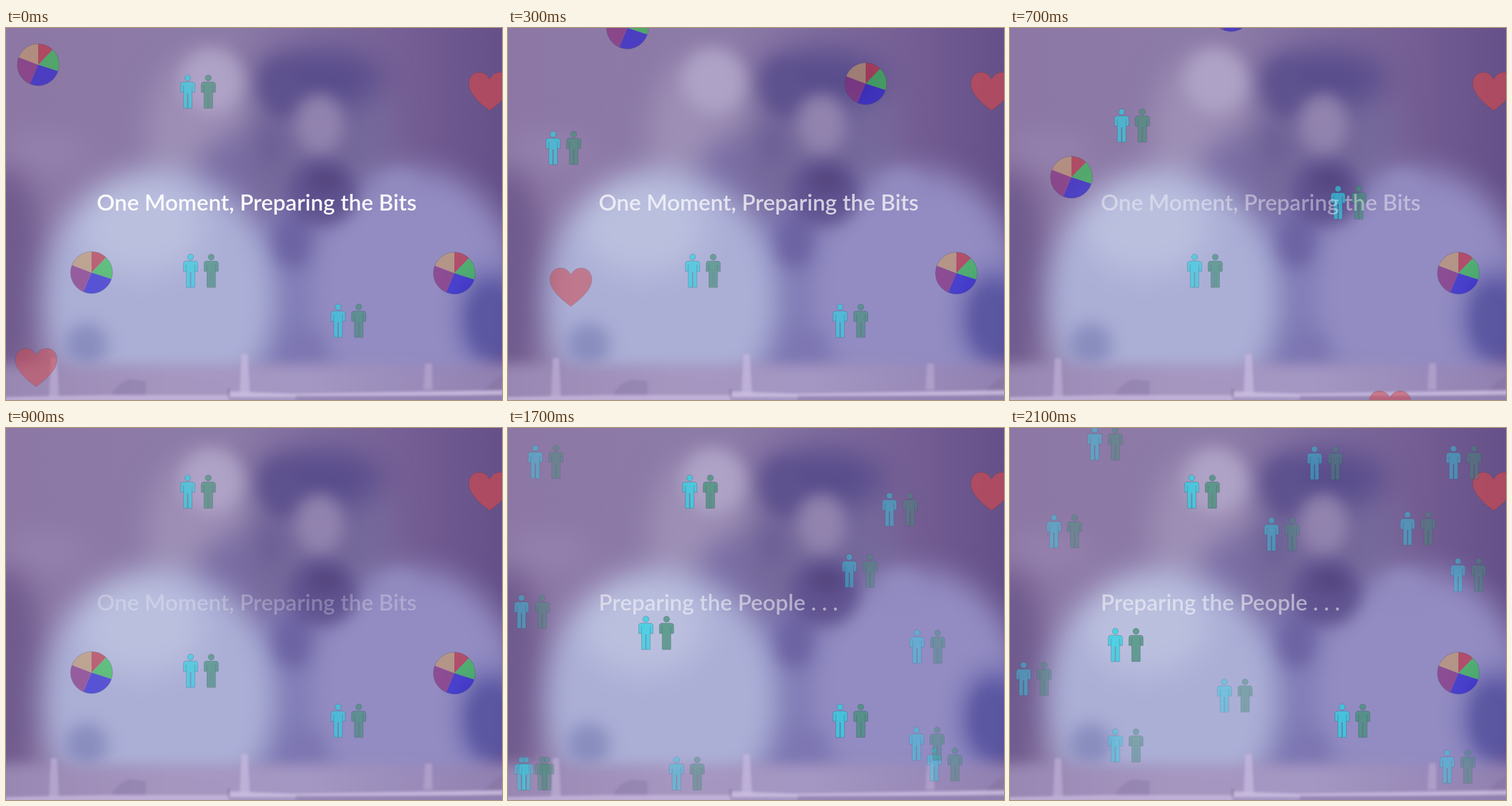
These frames come from a looping animation (864x648 px, 2.2 s). An HTML page:

```html
<!DOCTYPE html>
<html lang="en">
<head>
<meta charset="utf-8">
<title>Preparing</title>
<style>
html, body { margin: 0; width: 100%; height: 100%; overflow: hidden; background: #85749f; }
svg { display: block; width: 100vw; height: 100vh; }
text { font: 600 39px Lato, "Open Sans", sans-serif; fill: #fff; }
</style>
</head>
<body>
<svg id="stage" viewBox="0 0 864 648">
  <defs>
    <linearGradient id="wall">
      <stop offset="0" stop-color="#8d78a5"/>
      <stop offset=".45" stop-color="#8c7ba8"/>
      <stop offset=".8" stop-color="#755f94"/>
      <stop offset="1" stop-color="#655089"/>
    </linearGradient>
    <linearGradient id="floor">
      <stop offset="0" stop-color="#9584af"/>
      <stop offset=".35" stop-color="#a596c0"/>
      <stop offset=".6" stop-color="#a497c3"/>
      <stop offset="1" stop-color="#8d7cae"/>
    </linearGradient>
  </defs>
  <rect width="864" height="648" fill="url(#wall)"/>
  <g id="scene"></g>
  <g id="icons"></g>
  <text id="label" x="158" y="318"></text>
</svg>
<script>
const LOOP = 2200, STEP = 100;
const $ = id => document.getElementById(id);

function add(parent, tag, attrs) {
  const el = document.createElementNS('http://www.w3.org/2000/svg', tag);
  for (const k in attrs) el.setAttribute(k, attrs[k]);
  return parent.appendChild(el);
}

function soft(id, blur) {
  const f = add(document.querySelector('defs'), 'filter', {
    id, filterUnits: 'userSpaceOnUse', x: -120, y: -120, width: 1104, height: 888,
    'color-interpolation-filters': 'sRGB'
  });
  add(f, 'feGaussianBlur', { stdDeviation: blur });
  return add($('scene'), 'g', { filter: `url(#${id})` });
}

function blobs(layer, list) {
  for (const [cx, cy, rx, ry, fill] of list) add(layer, 'ellipse', { cx, cy, rx, ry, fill });
}

// Blurred backdrop: two figures in front of a wall, with a ledge below
blobs(soft('wide', 25), [
  [0, 430, 65, 190, '#705b8e'],
  [70, 215, 75, 35, '#9581ad'],
  [340, 190, 95, 150, '#9d8fb5'],
  [420, 290, 100, 110, '#7a6da3'],
  [545, 200, 130, 150, '#75689a'],
  [500, 470, 90, 160, '#7d78b3'],
  [710, 460, 185, 215, '#928cc2'],
  [265, 470, 205, 225, '#abafd6'],
  [235, 345, 110, 85, '#babfde'],
  [545, 88, 112, 52, '#594d8c'],
  [845, 505, 48, 80, '#5350a0']
]);
blobs(soft('mid', 14), [
  [358, 92, 54, 56, '#aea2c6'],
  [478, 105, 30, 48, '#5e528e'],
  [546, 168, 42, 52, '#9183ae'],
  [462, 205, 22, 34, '#6d6197'],
  [552, 285, 60, 58, '#605390'],
  [556, 266, 32, 22, '#55467f'],
  [500, 370, 32, 48, '#6d64a3'],
  [684, 275, 34, 24, '#918bc0'],
  [140, 552, 38, 38, '#898dbe'],
  [524, 556, 30, 26, '#7d76b2'],
  [838, 510, 26, 52, '#5c58a0']
]);
add(soft('mist', 11), 'rect', { x: -60, y: 586, width: 984, height: 120, fill: 'url(#floor)' });

const ledge = soft('fine', 2);
const shape = (d, fill, opacity = 1) => add(ledge, 'path', { d, fill, opacity });
shape('M78 575H89L92 642H75Z', '#b9aad2', .8);
shape('M410 568H421L425 638H407Z', '#c2b5dc', .85);
shape('M730 584H742L743 630H727Z', '#b4a4cf', .75);
shape('M182 641Q192 620 214 612L243 615V641Z', '#8e7eab', .6);
shape('M828 641Q842 615 870 602V641Z', '#85739f', .55);
shape('M-9 643L180 639H388V650H-9Z', '#c3b4da', .85);
shape('M388 633L505 637L870 631V639L530 643H388Z', '#cabde0', .9);
shape('M505 641L870 640V660H505Z', '#9180af', .75);
shape('M387 629H389V643H387Z', '#66577f', .8);

const LINE = { stroke: '#333a50', 'stroke-width': .7, 'stroke-opacity': .65 };

function pie(g) {
  const R = 36.5, at = deg => {
    const a = deg * Math.PI / 180;
    return `${R * Math.sin(a)} ${-R * Math.cos(a)}`;
  };
  const cuts = [0, 44, 108, 203, 291, 360];
  ['#c42b38', '#2cc443', '#2117d3', '#89277a', '#c99b66'].forEach((fill, i) =>
    add(g, 'path', { d: `M0 0L${at(cuts[i])}A${R} ${R} 0 0 1 ${at(cuts[i + 1])}Z`, fill }));
  add(g, 'circle', { r: R, fill: 'none', ...LINE });
}

function heart(g) {
  add(g, 'path', {
    d: 'M36.5 12C41 3 48 0 55 0C66 0 73 9 73 20C73 36 56 53 36.5 67C17 53 0 36 0 20C0 9 7 0 18 0C25 0 32 3 36.5 12Z',
    fill: '#d2484c', ...LINE
  });
}

function pair(g) {
  ['#2ad6e6', '#3f9274'].forEach((fill, i) => {
    const p = add(g, 'g', { transform: `translate(${36 * i})`, fill, ...LINE });
    add(p, 'circle', { cx: 12.5, cy: 6, r: 5.3 });
    add(p, 'path', { d: 'M5 13H20Q25 13 25 18V31H20V58Q20 59 19 59H13V33H12V59H6Q5 59 5 58V31H0V18Q0 13 5 13Z' });
    add(p, 'path', { d: 'M5 19V31M20 19V31', fill: 'none' });
  });
}

// Each key is [time, x, y]; the icon shows from `from` until `to`
const icons = [];
function icon(draw, alpha, keys, from = 0, to = LOOP) {
  const el = add($('icons'), 'g', {});
  draw(el);
  icons.push({ el, draw, alpha, keys, from, to });
}

icon(pie, .6, [[0, 149, 426], [300, 623, 97], [500, 65, 94], [900, 149, 426]], 0, 1700);
icon(pie, .6, [[0, 56, 64], [300, 208, 0], [500, 315, 9], [800, 420, -50], [1000, 420, -50], [1100, 56, 64]], 0, 1300);
icon(pie, .62, [[0, 781, 427]], 0, 1700);
icon(pie, .62, [[0, 781, 427]], 2100);
icon(heart, .65, [[0, 806, 77]]);
icon(heart, .52, [[0, 16, 558], [300, 73, 418], [500, 476, 496], [800, 700, 700], [1000, 700, 700], [1100, 16, 558]], 0, 1300);
icon(pair, .62, [[0, 304, 81], [300, 66, 179], [500, 60, 199], [900, 304, 81]]);
icon(pair, .62, [[0, 309, 393], [1600, 309, 393], [1900, 65, 195], [2100, 171, 348]]);
icon(pair, .62, [[300, 566, 480], [500, 552, 68], [900, 566, 480]]);

// The crowd: place at 1900 ms, then at 2100 ms
[
  [85, 13, 135, -3], [550, 125, 518, 31], [706, 71, 760, 30], [690, 248, 680, 145],
  [749, 391, 768, 226], [182, 363, 361, 436], [32, 441, 64, 150], [15, 572, 11, 407],
  [226, 572, 171, 523], [724, 540, 749, 560]
].forEach(([x, y, u, v]) => {
  const x0 = Math.max(11, 2 * x - u), y0 = Math.min(572, 2 * y - v);
  icon(pair, .42, [[1700, x0, y0], [1900, x, y], [2100, u, v]], 1700);
});
icon(pair, .42, [[2000, 490, 190], [2100, 443, 155]], 2000);

function place(keys, t) {
  const i = keys.findIndex(k => k[0] > t);
  if (i === 0) return keys[0].slice(1);
  if (i < 0) return keys[keys.length - 1].slice(1);
  const [a, b] = [keys[i - 1], keys[i]], f = (t - a[0]) / (b[0] - a[0]);
  return [a[1] + (b[1] - a[1]) * f, a[2] + (b[2] - a[2]) * f];
}

function draw(t) {
  for (const { el, draw: kind, alpha, keys, from, to } of icons) {
    const on = t >= from && t < to;
    el.setAttribute('visibility', on ? 'visible' : 'hidden');
    if (!on) continue;
    el.setAttribute('transform', `translate(${place(keys, t)})`);
    el.setAttribute('opacity', kind === pair && alpha > .5 && t >= 1700 ? .72 : alpha);
  }
  const first = t < 1100;
  $('label').textContent = first ? 'One Moment, Preparing the Bits' : 'Preparing the People . . .';
  $('label').setAttribute('opacity', first ? .95 - t * .00077 : t < 1300 ? .25 : .5);
}

const start = performance.now();
let shown = -1;
function tick() {
  const t = Math.floor((performance.now() - start) % LOOP / STEP) * STEP;
  if (t !== shown) draw(shown = t);
  requestAnimationFrame(tick);
}
tick();
</script>
</body>
</html>
```
